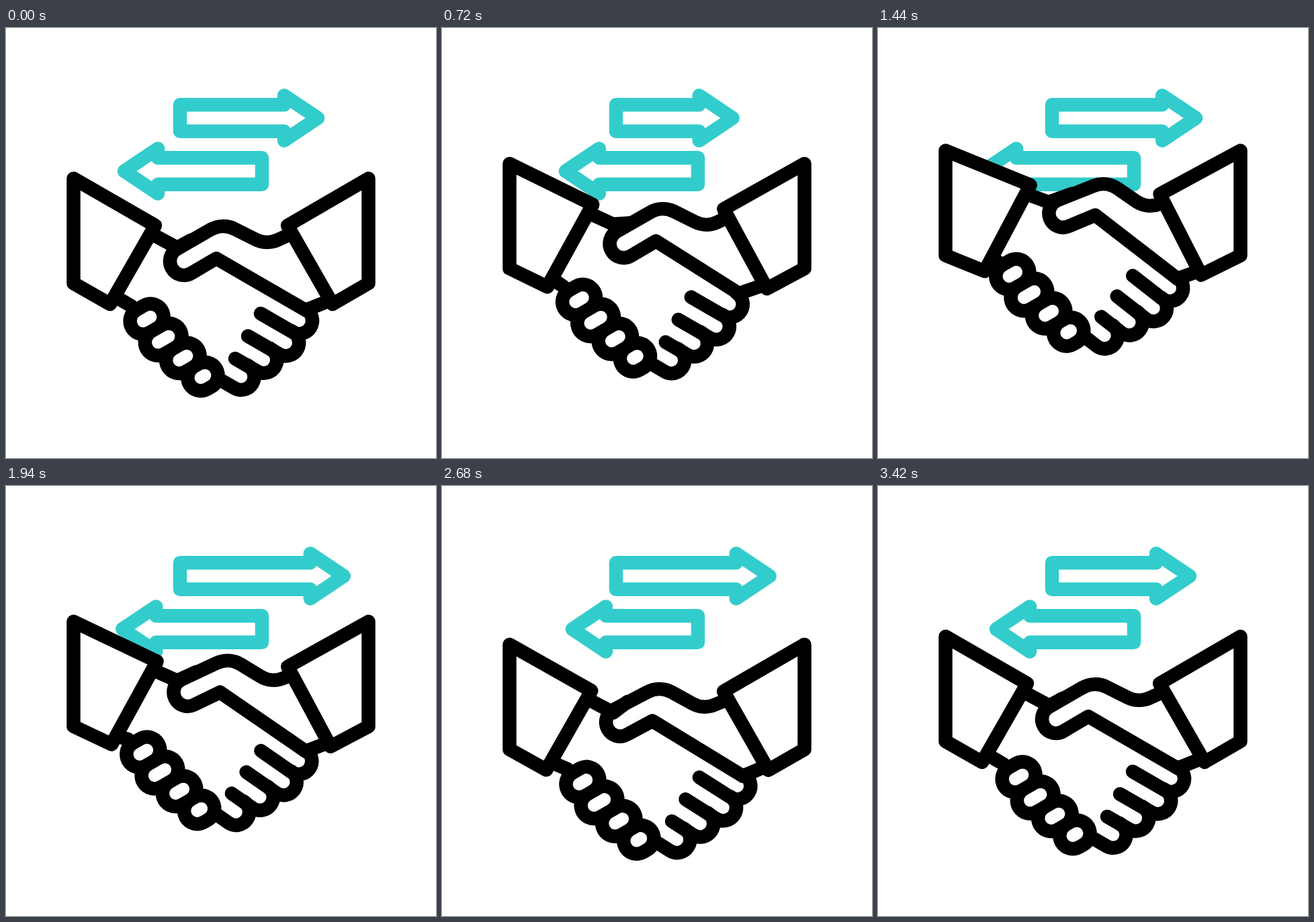
An HTML page with a canvas for the animation above (3.6 s loop, 640x640 px).

```html
<!DOCTYPE html>
<html lang="en">
<head>
<meta charset="utf-8">
<title>Handshake</title>
<style>
html, body { margin: 0; height: 100%; overflow: hidden; background: #fff; }
canvas { display: block; width: 640px; height: 640px; }
</style>
</head>
<body>
<canvas id="stage" width="640" height="640"></canvas>
<script>
const ctx = document.getElementById('stage').getContext('2d');
const LOOP = 3600, MOVE = 3420, SHAKE = MOVE / 2;
const WIDTH = 20.5, KNUCKLE = 19.6, SLANT = Math.PI / 6;

// Cosine easing from 0 through each [time, value] stop, back to 0 at time 1
function swing(p, ...stops) {
  let [t0, v0] = [0, 0];
  for (const [t1, v1] of [...stops, [1, 0]]) {
    if (p <= t1) return v0 + (v1 - v0) * (1 - Math.cos(Math.PI * (p - t0) / (t1 - t0))) / 2;
    [t0, v0] = [t1, v1];
  }
  return 0;
}

const mix = (p, q, k) => [p[0] + (q[0] - p[0]) * k, p[1] + (q[1] - p[1]) * k];
const polar = ([x, y], r, a) => [x + r * Math.cos(a), y + r * Math.sin(a)];

function trace(...points) {
  ctx.beginPath();
  points.forEach(p => ctx.lineTo(...p));
}

function stroke(color = '#000', width = WIDTH) {
  ctx.strokeStyle = color;
  ctx.lineWidth = width;
  ctx.stroke();
}

function fill() {
  ctx.fillStyle = '#fff';
  ctx.fill();
}

function arrow(tail, neck, y, dir) {
  trace([tail, y - 19.7], [neck, y - 19.7], [neck, y - 33.5], [neck + dir * 50, y],
    [neck, y + 33.5], [neck, y + 19.7], [tail, y + 19.7]);
  ctx.closePath();
  stroke('#33cccc');
}

function sleeve(x, [top, bottom]) {
  trace([x, 224], top, bottom, [x, 380]);
  ctx.closePath();
  fill();
  stroke();
}

// arms: raise of the forearms, turn: rotation of the right hand, which follows later
function handshake(arms, turn) {
  const lag = 2 * (arms - turn), angle = .14 * turn;
  const arm = (x, y, dx, dy) => [x + arms * dx, y + arms * dy];
  const rotate = (x, y) => polar([486, 411], Math.hypot(x - 486, y - 411), Math.atan2(y - 411, x - 486) + angle);
  const shift = ([x, y], dx, dy) => [x + lag * dx, y + lag * dy];
  const palm = (x, y) => shift(rotate(x, y), 6, -4);
  const finger = (x, y) => shift(rotate(x, y), -9, -2.5);
  const grip = (x, y) => shift([x - 10 * turn, y - 26 * turn], -6, -7);

  const cuffL = [arm(222, 294, 5, -20), arm(155, 411, 4, -8)];
  const cuffR = [arm(419, 294, .5, -5.5), arm(486, 411, -5.5, -2)];
  const wristL = mix(...cuffL, .1), heelL = mix(...cuffL, .9);
  const wristR = mix(...cuffR, .1), heelR = mix(...cuffR, .95);
  const forearm = [wristL, arm(255, 327, -1, -28), palm(275, 316)];
  const palmEnd = mix(finger(446, 420), palm(446, 420), .3);
  const ridge = () => {
    ctx.arcTo(...palm(322, 290), ...palm(388, 323), 38);
    ctx.arcTo(...palm(388, 323), ...wristR, 38);
    ctx.lineTo(...wristR);
  };

  trace(...forearm);
  ridge();
  ctx.lineTo(...heelR);
  ctx.lineTo(...heelL);
  fill();

  trace(palmEnd, palm(313, 343));
  ctx.arc(...palm(265, 347), 21, angle + 2 * SLANT, angle - 4 * SLANT);
  ridge();
  stroke();
  trace(...forearm);
  stroke();
  trace(heelL, grip(187, 414));
  stroke();
  trace(heelR, palmEnd);
  stroke();

  [55, 54, 38, 21].forEach((length, i) => {
    const start = finger(379 - 19 * i, 425 + 33.5 * i);
    const end = polar(start, length, SLANT + angle);
    trace(start, end);
    ctx.arc(...polar(end, KNUCKLE, angle - 2 * SLANT), KNUCKLE, angle + 4 * SLANT, angle - 2 * SLANT, true);
    stroke();
  });

  const knuckles = [12.5, 18, 13, 7].map((length, i) => {
    const end = grip(215 + 27 * i, 430 + 29 * i);
    return [end, polar(end, -length, -SLANT)];
  });
  for (const [color, width] of [['#000', 2 * KNUCKLE + WIDTH], ['#fff', 2 * KNUCKLE - WIDTH]]) {
    for (const k of knuckles) {
      trace(...k);
      stroke(color, width);
    }
  }

  sleeve(100.5, cuffL);
  sleeve(539.5, cuffR);
}

function draw() {
  const t = Math.min(Math.floor(performance.now() % LOOP / 20) * 20, MOVE);
  const p = t % SHAKE / SHAKE;
  ctx.fillStyle = '#fff';
  ctx.fillRect(0, 0, 640, 640);
  ctx.lineCap = ctx.lineJoin = 'round';

  arrow(259, 414 + swing(p, [.14, 39], [.37, -39], [.6, 27]), 134, 1);
  arrow(381, 226 + swing(t / MOVE, [.2, 8], [.45, -21], [.71, 22], [.97, 0]), 213, -1);

  ctx.save();
  ctx.translate(0, swing(p, [.29, -50], [.57, 12], [.83, -42]));
  handshake(swing(p, [.28, 1.15], [.53, 0], [.78, 1.15]), swing(p, [.2, .8], [.4, 0], [.85, 1]));
  ctx.restore();
  requestAnimationFrame(draw);
}
draw();
</script>
</body>
</html>
```
